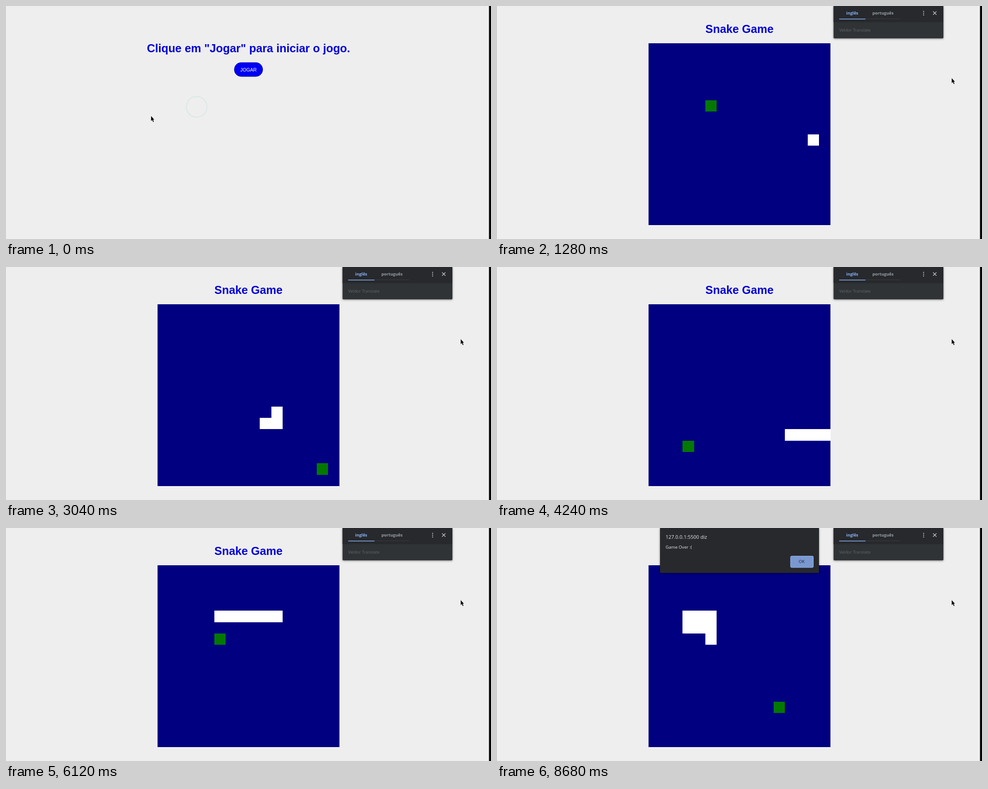
These frames come from a looping animation (1080 px wide and 519 px high, 9160 ms). An HTML page:

```html
<!DOCTYPE html>
<html lang="pt">
<head>
<meta charset="utf-8">
<title>Snake</title>
<style>
  html, body { margin: 0; width: 100%; height: 100%; overflow: hidden; background: #eee; }
  svg { display: block; position: absolute; left: 0; top: 0; }
  .title { font: bold 25.3px "Liberation Sans", Arial, sans-serif; fill: #0000d6; text-anchor: middle; }
  .button { font: 10.6px "Liberation Sans", Arial, sans-serif; fill: #fff; text-anchor: middle; }
  .ui { font: 9.6px "Open Sans", "Noto Sans", sans-serif; fill: #e8eaed; }
  .tab { font-size: 9.2px; font-weight: 700; text-anchor: middle; }
  #popup, #dialog { filter: drop-shadow(0 1px 2px rgba(0, 0, 0, .5)); }
</style>
</head>
<body>
<svg width="1080" height="519" viewBox="0 0 1080 519">
  <defs>
    <linearGradient id="rim" x2="0" y2="1">
      <stop offset="0" stop-color="#0000d0"/>
      <stop offset="1" stop-color="#000080"/>
    </linearGradient>
  </defs>
  <rect width="1080" height="519" fill="#eee"/>

  <g id="start">
    <text class="title" x="540" y="103">Clique em "Jogar" para iniciar o jogo.</text>
    <rect x="508.6" y="126.2" width="62.8" height="30.6" rx="15.3" fill="#0000f2" stroke="url(#rim)" stroke-width="1.2"/>
    <text class="button" x="540" y="145.8">JOGAR</text>
    <circle id="ring" cx="424.5" cy="224.5" r="23" fill="none" stroke="#d8e9e6" stroke-width="2"/>
  </g>

  <g id="game">
    <text class="title" x="540" y="60">Snake Game</text>
    <rect x="337.5" y="83" width="405" height="405" fill="#000080"/>
    <path id="snake" fill="#fff"/>
    <path id="food" fill="#047800"/>
  </g>

  <g id="popup" class="ui">
    <path d="M749.5 0H994V70a2 2 0 0 1-2 2H751.5a2 2 0 0 1-2-2Z" fill="#303336"/>
    <path d="M749.5 0H994V36H749.5Z" fill="#27292c"/>
    <path d="M820 28.5H898" stroke="#383b3f"/>
    <path d="M762 29H820.5" stroke="#8ab4f8" stroke-width="1.6"/>
    <text class="tab" x="791" y="19" fill="#8ab4f8" style="fill:#8ab4f8">inglês</text>
    <text class="tab" x="859.5" y="19" style="fill:#9aa0a6">português</text>
    <g fill="#b4b7bb">
      <circle cx="950" cy="12" r="1.2"/>
      <circle cx="950" cy="16" r="1.2"/>
      <circle cx="950" cy="20" r="1.2"/>
    </g>
    <path d="M971 12l7.6 7.6M978.6 12l-7.6 7.6" stroke="#c4c7cb" stroke-width="1.4"/>
    <text x="762" y="57" style="fill:#62666a;font-size:9.3px">Veldor Translate</text>
  </g>

  <g id="dialog" class="ui">
    <path d="M363 0H717V98a2 2 0 0 1-2 2H365a2 2 0 0 1-2-2Z" fill="#27292c"/>
    <text x="375.5" y="23.7" style="font-size:11px">127.0.0.1:5500 diz</text>
    <text x="375.5" y="46">Game Over :(</text>
    <rect x="653.7" y="62.5" width="50.8" height="25.5" rx="2.5" fill="#7a99d2" stroke="#93b5f0"/>
    <text x="678.5" y="78.4" text-anchor="middle" style="fill:#202124">OK</text>
  </g>

  <rect x="1075.5" width="4.5" height="519" fill="#000"/>
  <path id="cursor" d="M0 0V11.2L2.5 9L4.6 13.4L6.4 12.6L4.4 8.3H7.4Z" fill="#000" stroke="#fff" stroke-opacity=".5" stroke-width=".4"/>
</svg>
<script>
const LOOP = 9160, TICK = 50, FIRST = 962, PAGE = 955;
const $ = id => document.getElementById(id);
const clamp = v => Math.max(0, Math.min(1, v));

// Head positions, one per tick
const DIRS = { R: [1, 0], L: [-1, 0], U: [0, -1], D: [0, 1] };
const moves = 'R6 U3 L11 U4 R4 D9 R3 U5 R4 D9 R1 U3 L12 D2 R5 U4 R5 U5 L9 D5 R3 U5 L4 D3 R7 D4 L5 U7 L2 D1 R1';
const heads = [[8, 8]];
for (const move of moves.split(' ')) {
  const [dx, dy] = DIRS[move[0]];
  for (let i = +move.slice(1); i > 0; i--) {
    const [x, y] = heads[heads.length - 1];
    heads.push([x + dx, y + dy]);
  }
}

const foods = [[5, 5], [7, 9], [14, 14], [3, 12], [13, 7], [5, 6], [11, 12]];

// Number of foods eaten before each tick
const eaten = [0];
for (let n = 1; n < heads.length; n++) {
  const k = eaten[n - 1];
  eaten.push(k + (String(heads[n - 1]) === String(foods[k]) ? 1 : 0));
}

const edge = (origin, i) => Math.round(origin + i * 25.3125);
const cell = ([x, y]) =>
  `M${edge(337.5, x)} ${edge(83, y)}H${edge(337.5, x + 1)}V${edge(83, y + 1)}H${edge(337.5, x)}Z`;

// Pointer keys: time, x, y
const track = [[0, 323, 245], [480, 543, 142], [640, 548, 140], [920, 854, 62], [1180, 1012.5, 160.5]];

function pointer(t) {
  let i = 1;
  while (i < track.length - 1 && t > track[i][0]) i++;
  const [t0, x0, y0] = track[i - 1], [t1, x1, y1] = track[i];
  const p = clamp((t - t0) / (t1 - t0));
  const e = p * p * (3 - 2 * p);
  return [x0 + (x1 - x0) * e, y0 + (y1 - y0) * e];
}

const show = (id, on) => $(id).setAttribute('visibility', on ? 'visible' : 'hidden');
const fade = (id, a) => { $(id).style.opacity = clamp(a); };

function draw(t) {
  const playing = t >= PAGE;
  show('start', !playing);
  show('game', playing);
  fade('ring', 1 - t / 120);
  fade('popup', (t - 1120) / 80);
  fade('dialog', (t - 8610) / 60);
  $('cursor').setAttribute('transform', `translate(${pointer(t)})`);

  const n = Math.max(0, Math.min(heads.length - 1, Math.floor((t - FIRST) / TICK)));
  const k = eaten[n];
  $('snake').setAttribute('d', heads.slice(Math.max(0, n - k), n + 1).map(cell).join(''));
  $('food').setAttribute('d', cell(foods[k]));
}

const begin = performance.now();
function frame() {
  draw((performance.now() - begin) % LOOP);
  requestAnimationFrame(frame);
}
frame();
</script>
</body>
</html>
```
